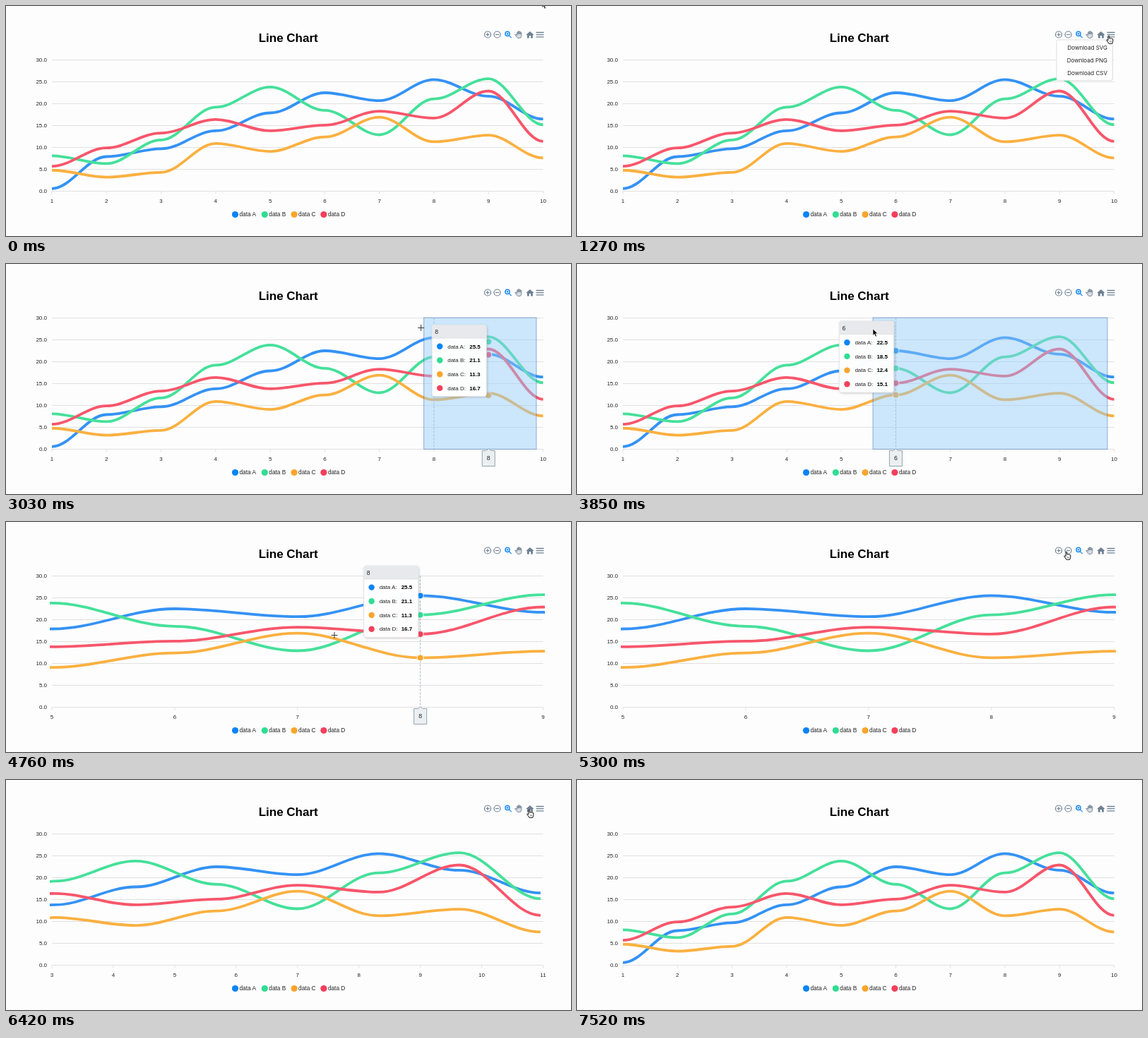
Write an HTML page that moves like this. It is 800 px wide and 326 px high and loops after 7.55 s.

```html
<!DOCTYPE html>
<html lang="en">
<head>
<meta charset="utf-8">
<title>Line Chart</title>
<style>
  html, body { margin: 0; width: 100%; height: 100%; overflow: hidden; background: #fdfdfd; }
  svg { display: block; width: 800px; height: 326px; }
  text { font: 8px "Liberation Sans", Arial, sans-serif; fill: #222; }
  .mid { text-anchor: middle; }
  .end { text-anchor: end; }
  .title { font-size: 17px; font-weight: bold; fill: #000; }
  .legend { font-size: 8.3px; }
  .head { font-size: 8.7px; }
  .bold { font-weight: bold; fill: #000; }
  .menu { font-family: Inter, "Liberation Sans", sans-serif; }
  .icon { fill: none; stroke: #6e8192; stroke-width: 1.2; }
</style>
</head>
<body>
<svg viewBox="0 0 800 326">
  <defs>
    <clipPath id="plot"><rect x="62" y="66" width="701" height="206"/></clipPath>
    <filter id="shadow" x="-20%" y="-20%" width="140%" height="140%">
      <feDropShadow dx="1" dy="1" stdDeviation="1.6" flood-color="#777" flood-opacity=".4"/>
    </filter>
  </defs>
  <g id="base"></g>
  <g id="live"></g>
</svg>
<script>
const LOOP = 7550;
const LEFT = 65, RIGHT = 760.5, TOP = 76.5, BOTTOM = 262.5;
const MENU = { open: 850, close: 1480 };
const DRAG = { start: 2785, end: 3285 };
const ZOOM_IN = 3900, ZOOM_OUT = 5520, RESET = 6450;
const HOVER_LAG = 80, HOVER_GLIDE = 135, MORPH = 300;

const series = [
  { name: 'data A', dot: '#0984f6', line: '#3492f4', v: [0.6, 7.9, 9.7, 13.8, 17.9, 22.5, 20.7, 25.5, 21.7, 16.5] },
  { name: 'data B', dot: '#2edd92', line: '#45e09a', v: [8.1, 6.3, 11.7, 19.2, 23.8, 18.5, 12.9, 21.1, 25.7, 15.2] },
  { name: 'data C', dot: '#f9a52d', line: '#fab040', v: [4.8, 3.2, 4.3, 10.9, 9.1, 12.4, 16.9, 11.3, 12.8, 7.6] },
  { name: 'data D', dot: '#f43f5b', line: '#f7566b', v: [5.7, 9.9, 13.3, 16.4, 13.8, 15.1, 18.3, 16.7, 22.9, 11.4] }
];

const full = { axis: [1, 10], line: [1, 10] };
const near = { axis: [5, 9], line: [5, 9] };
const wide = { axis: [3, 11], line: [3.968, 10.032] };

// Pointer moves: start, end, x, y
const moves = [
  [0, 0, 759, -7],
  [80, 480, 753, 42],
  [1420, 2300, 751, 88],
  [DRAG.start, DRAG.end, 419, 92],
  [4240, 4500, 545, 140],
  [4640, 4760, 465, 160],
  [4860, 5300, 693, 42],
  [6150, 6330, 741, 42],
  [6550, 6820, 757, -16]
];

const lerp = (a, b, p) => a + (b - a) * p;
const clamp = p => Math.max(0, Math.min(1, p));
const smooth = p => p * p * (3 - 2 * p);
const yOf = v => BOTTOM - v * 6.2;
const xOf = (n, [min, max]) => LEFT + (n - min) / (max - min) * (RIGHT - LEFT);
const inPlot = ([x, y]) => x > LEFT - 3 && x < RIGHT + 3 && y > TOP && y < BOTTOM;
const label = (x, y, s, cls = '') => `<text x="${x}" y="${y}" class="${cls}">${s}</text>`;
const circle = (x, y, r, attrs) => `<circle cx="${x}" cy="${y}" r="${r}" ${attrs}/>`;
const stroke = (d, attrs) => `<path d="${d}" fill="none" ${attrs}/>`;

function pointer(t) {
  let [, , x, y] = moves[0];
  for (const [start, end, toX, toY] of moves.slice(1)) {
    const p = clamp((t - start) / (end - start));
    const e = start === DRAG.start ? p : smooth(p);
    x = lerp(x, toX, e);
    y = lerp(y, toY, e);
  }
  return [x, y];
}

const viewAt = t => t < ZOOM_IN ? full : t < ZOOM_OUT ? near : t < RESET ? wide : full;

function lineRange(t) {
  let range = full.line;
  for (const start of [ZOOM_IN, ZOOM_OUT, RESET]) {
    const p = smooth(clamp((t - start) / MORPH));
    range = range.map((v, k) => lerp(v, viewAt(start).line[k], p));
  }
  return range;
}

// Category nearest to the pointer, or 0 outside the plot
function hovered(t) {
  const at = pointer(t - HOVER_LAG), [min, max] = viewAt(t).axis;
  return inPlot(at) ? Math.round(lerp(min, max, clamp((at[0] - LEFT) / (RIGHT - LEFT)))) : 0;
}

// Glides between points: the mean of [x, ...heights] over the recent past
function hoverPose(t) {
  const steps = 27, poses = [];
  for (let i = 0; i < steps; i++) {
    const past = t - i * HOVER_GLIDE / steps, n = hovered(past);
    if (n) poses.push([xOf(n, viewAt(past).axis), ...series.map(s => yOf(s.v[n - 1]))]);
  }
  return poses[0].map((_, k) => poses.reduce((sum, p) => sum + p[k], 0) / poses.length);
}

function drawBase() {
  let s = label(399.7, 51, 'Line Chart', 'mid title');
  for (let v = 0; v <= 30; v += 5) {
    s += stroke(`M${LEFT} ${yOf(v)}H${RIGHT}`, 'stroke="#e0e0e1"');
    s += label(58, yOf(v) + 2.7, v.toFixed(1), 'end');
  }
  series.forEach((d, i) => {
    const x = 324.5 + i * 41.8;
    s += circle(x, 295.5, 4.6, `fill="${d.dot}"`) + label(x + 6, 298.3, d.name, 'legend');
  });
  s += `<g class="icon">
    <circle cx="682" cy="40.5" r="4.5"/><path d="M679.5 40.5h5M682 38v5"/>
    <circle cx="695.5" cy="40.5" r="4.5"/><path d="M693 40.5h5"/>
    <g stroke="#1486f5" stroke-width="1.4"><circle cx="710" cy="39.4" r="3.1"/><path d="M712.3 41.7l3.4 3.4M708.6 39.4h2.8M710 38v2.8" stroke-width="1.2"/></g>
    <path d="M723.6 41.5v-4.3q.8-1 1.5 0v2.8v-4q.8-1 1.6 0v4v-3.6q.8-.9 1.6 0v3.7v-2.3q.8-.8 1.6 0v4.7q-.4 3.2-3.6 3.2q-2.2 0-3.4-2l-2.2-3.2q1.1-1.3 2.9 1z" fill="#d8dde2" stroke-width=".9"/>
    <path d="M740.8 45.5v-3.4h2.3v3.4h2.8v-4.5h1.7l-5.7-5.1l-5.7 5.1h1.7v4.5z" fill="#6e8192" stroke="none"/>
    <path d="M750.5 37.5h11M750.5 40.7h11M750.5 43.9h11" stroke-width="1.3"/></g>`;
  document.getElementById('base').innerHTML = s;
}

function drawChart(t) {
  const { axis } = viewAt(t), range = lineRange(t);
  let s = '';
  for (let n = axis[0]; n <= axis[1]; n++) {
    const x = xOf(n, axis);
    s += stroke(`M${x} 262.5v4`, 'stroke="#e0e0e1"') + label(x, 278.7, n, 'mid');
  }
  s += '<g clip-path="url(#plot)">';
  for (const d of series) {
    let c = '', px, py;
    d.v.forEach((v, i) => {
      const x = xOf(i + 1, range), y = yOf(v), h = (x - px) * 0.35;
      c += i ? `C${px + h} ${py} ${x - h} ${y} ${x} ${y}` : `M${x} ${y}`;
      px = x; py = y;
    });
    s += stroke(c, `stroke="${d.line}" stroke-width="3.8"`);
  }
  return s + '</g>';
}

function drawSelection(t) {
  if (t < DRAG.start || t >= ZOOM_IN) return '';
  const right = 751, x = Math.min(right, pointer(t - 6)[0]);
  return `<rect x="${x}" y="76" width="${right - x}" height="186.5" fill="#90caf9" fill-opacity=".45" stroke="#0d47a1" stroke-opacity=".4"/>`;
}

function drawMarkers(n, t, [x, ...ys]) {
  const lineX = xOf(n, viewAt(t).axis);
  return stroke(`M${lineX} ${TOP}V${BOTTOM}`, 'stroke="#aab2b9" stroke-dasharray="3 2"') +
    ys.map((y, k) => circle(x, y, 4.5, `fill="${series[k].dot}" stroke="#fff" stroke-opacity=".9"`)).join('');
}

function drawTooltip(n, [x, y]) {
  const w = n > 9 ? 12 : 9;
  let s = `<path d="M${x - w} 264.5h${w - 3}l3-3l3 3h${w - 3}v22h${-2 * w}z" fill="#eceff1" stroke="#90a4ae"/>` + label(x, 278.3, n, 'mid head');
  s += `<g transform="translate(${x - 80} ${y - 42})">
    <rect width="77" height="101" rx="3" fill="#fff" fill-opacity=".97" stroke="#e3e3e3" stroke-width=".8" filter="url(#shadow)"/>
    <path d="M0 18.5V3q0-3 3-3h71q3 0 3 3v15.5z" fill="#e7e9ec"/><path d="M0 18.5h77" stroke="#ddd" stroke-width=".8"/>` + label(4, 12.5, n, 'head');
  series.forEach((d, k) => {
    const row = 30.2 + k * 19.7;
    s += circle(11, row, 4.2, `fill="${d.dot}"`) + label(22, row + 2.8, d.name + ':') + label(53, row + 2.8, d.v[n - 1].toFixed(1), 'bold');
  });
  return s + '</g>';
}

function drawMenu(t) {
  if (t < MENU.open || t >= MENU.close) return '';
  let s = '<rect x="679" y="48" width="79.5" height="57.5" rx="2.5" fill="#fff" stroke="#ddd"/>';
  ['SVG', 'PNG', 'CSV'].forEach((kind, i) => s += label(751, 62.2 + i * 17.7, 'Download ' + kind, 'end menu'));
  return s;
}

const cursors = {
  arrow: '<path d="M0 0v9.3l2.1-2l1.6 3.7l1.7-.7l-1.6-3.6h2.9z" fill="#000" stroke="#fff" stroke-width=".6"/>',
  cross: '<path d="M-4.5 .5h9M0 -4v9" stroke="#222" stroke-width=".9"/>',
  hand: '<path d="M-1 .8q.9-1.4 1.8 0v3.4q.9-.9 1.7 0q.9-.7 1.7.2q1-.5 1.6.5v3.2l-1 3.2h-4.8l-3.3-5q.4-1.4 2.3.4z" fill="#fff" stroke="#111"/><path d="M1.7 7.3v2M3.3 7.3v2" stroke="#111" stroke-width=".6"/>'
};

function drawPointer(t) {
  const [x, y] = pointer(t), released = t > DRAG.end && t < ZOOM_IN;
  const kind = Math.abs(y - 42) < 5 ? 'hand' : inPlot([x, y]) && !released ? 'cross' : 'arrow';
  return `<g transform="translate(${x} ${y})">${cursors[kind]}</g>`;
}

const live = document.getElementById('live');
function draw(t) {
  const n = hovered(t), pose = n && hoverPose(t);
  live.innerHTML = drawChart(t) + (n ? drawMarkers(n, t, pose) : '') + drawSelection(t) +
    (n ? drawTooltip(n, [pose[0], pose[1]]) : '') + drawMenu(t) + drawPointer(t);
}

drawBase();
draw(0);
const begin = performance.now();
requestAnimationFrame(function tick() {
  draw((performance.now() - begin) % LOOP);
  requestAnimationFrame(tick);
});
</script>
</body>
</html>
```
